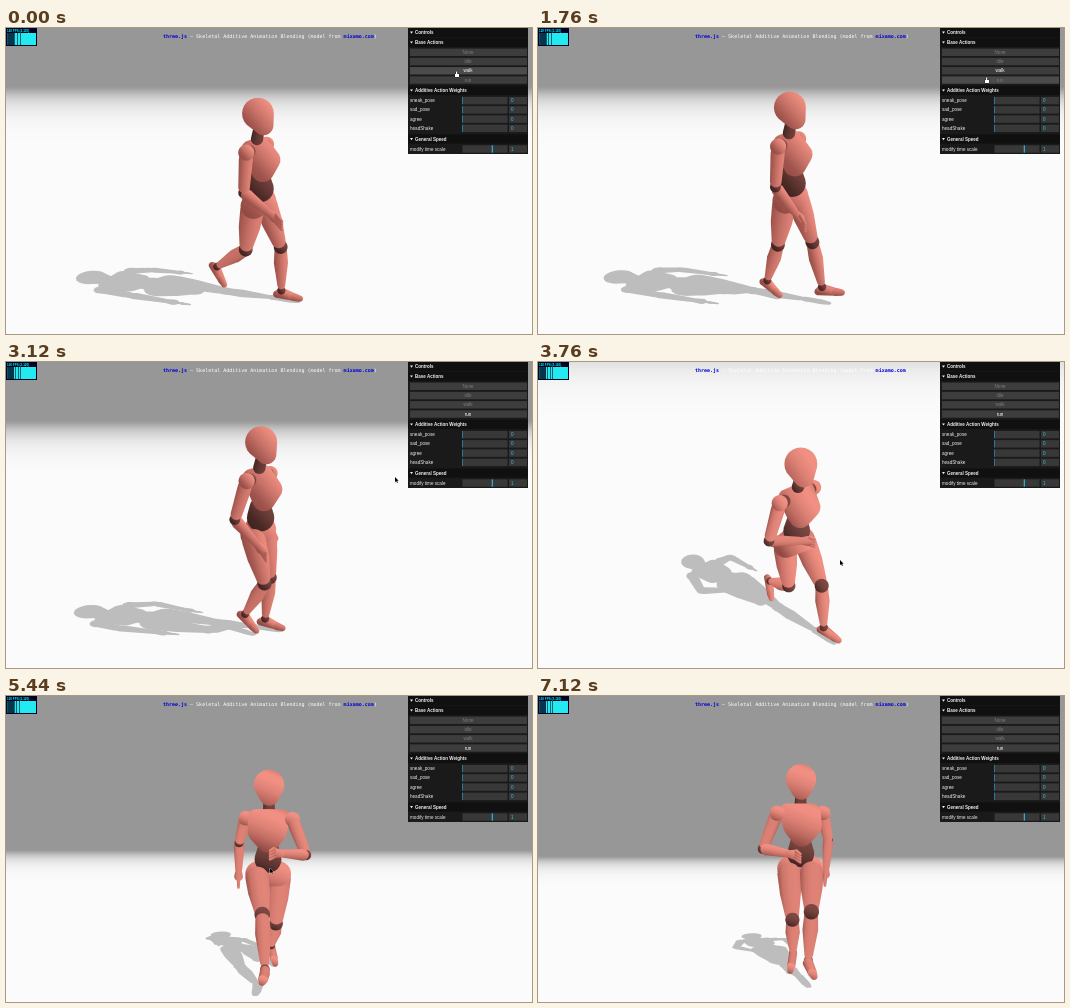
These frames come from a looping animation (526 px wide and 306 px high, 7.2 s). An HTML page with a canvas:

```html
<!DOCTYPE html>
<html lang="en">
<head>
<meta charset="utf-8">
<title>Skeletal blending</title>
<style>
html, body { margin: 0; width: 100%; height: 100%; overflow: hidden; background: #979797; }
canvas { display: block; }
</style>
</head>
<body>
<canvas id="stage" width="526" height="306"></canvas>
<script>
const ctx = document.getElementById('stage').getContext('2d');
const W = 526, H = 306, LOOP = 7200, STEP = 80;
const CX = 263, CY = 166, FOCAL = 396, ORBIT = 3.317;
const { sin, cos, exp, hypot, min, max, floor, PI } = Math;
const TAU = 2 * PI;

const clamp = v => min(1, max(0, v));
const smooth = v => (v = clamp(v)) * v * (3 - 2 * v);
const mix = (a, b, k) => a + (b - a) * k;
const mean = list => list.reduce((s, v) => s + v, 0) / list.length;
const wave = p => cos(TAU * p);
const bump = (p, mid, width) => {
  const d = p - mid - Math.round(p - mid);
  return exp(-((d / width) ** 2));
};

// Eased interpolation over rows of [time, ...values].
function track(keys, t) {
  let i = 0;
  while (i < keys.length - 2 && t >= keys[i + 1][0]) i++;
  const [a, b] = [keys[i], keys[i + 1]];
  const k = smooth((t - a[0]) / (b[0] - a[0]));
  return a.slice(1).map((v, n) => mix(v, b[n + 1], k));
}

// Time, azimuth and pitch in degrees.
const CAMERA = [[0, -62, 17.5], [3240, -62, 17.5], [3760, -35, 28.5], [4800, -4, 5.8], [5760, -4, 2.2], [7200, -4, 2.2]];
const POINTER = [[0, 451, 46], [880, 451, 46], [1600, 449, 52], [2720, 449, 52], [3120, 389, 115],
  [3760, 302, 198], [4800, 267, 176], [5440, 264, 172], [6080, 376, 28], [6400, 402, -14], [7200, 402, -14]];

let view;
function setCamera(t) {
  const [az, pitch] = track(CAMERA, t).map(d => d * PI / 180);
  view = { sa: sin(az), ca: cos(az), sp: sin(pitch), cp: cos(pitch) };
  const toEye = ([x, y, z]) => {
    const near = x * view.sa + z * view.ca;
    return [x * view.ca - z * view.sa, y * view.cp - near * view.sp, near * view.cp + y * view.sp];
  };
  view.light = toEye([.21, .69, .69]);
  view.project = ([x, y, z]) => {
    const [h, v, d] = toEye([x, y - 1, z]);
    const scale = FOCAL / (ORBIT - d);
    return [CX + h * scale, CY - v * scale, scale];
  };
}

// Joint angles: hip, knee, shoulder, elbow, forearm turn, arm spread.
const walk = p => [.1 + .38 * wave(p), .1 + .95 * bump(p, .68, .13) + .3 * bump(p, .12, .1),
  -.2 + .2 * wave(p), .65 + .35 * wave(p - .12), .1, .12];
const run = p => [.4 + .45 * wave(p), .62 + .8 * bump(p, .7, .18),
  -.4 + .4 * wave(p), 1.2 + .45 * wave(p), .8, .36];

function buildBody(t) {
  const parts = [];
  const w = smooth((t - 2960) / 440);
  const walkPhase = .09 + t / 970, runPhase = .08 + (t - 3760) / 700;
  const gait = shift => {
    const r = run(runPhase + shift);
    return walk(walkPhase + shift).map((v, i) => mix(v, r[i], w));
  };
  const lean = .13 * w, rootZ = -.1;
  const twist = mix(.1 * wave(walkPhase), .24 * wave(runPhase), w);
  const add = (spheres, tone = 'skin', bias = 0) => parts.push({ spheres, tone, bias });
  const turn = ([x, y, z], a) => [x * cos(a) + z * sin(a), y, z * cos(a) - x * sin(a)];
  const torso = (x, y, z, a = twist) => {
    [x, y, z] = turn([x, y, z], a);
    return [x, y * cos(lean) - z * sin(lean), rootZ + y * sin(lean) + z * cos(lean)];
  };
  const move = (p, d, len) => p.map((v, i) => v + d[i] * len);
  const ball = (p, r) => [...p, r];

  add([ball(torso(0, .755, 0, 0), .127), ball(torso(0, .665, .05, 0), .08)]);
  add([ball(torso(0, .55, -.01), .05), ball(torso(0, .62, .005, 0), .046)], 'joint', -.04);
  add([ball(torso(-.11, .485, -.02), .07), ball(torso(.11, .485, -.02), .07),
    ball(torso(-.07, .37, .07), .092), ball(torso(.07, .37, .07), .092), ball(torso(0, .29, .04), .095)]);
  add([ball(torso(0, .13, .015), .115), ball(torso(0, .22, .01), .09)], 'joint', -.04);
  add([ball([-.09, 0, rootZ], .108), ball([.09, 0, rootZ], .108), ball([0, .04, rootZ], .112)]);

  for (const side of [1, -1]) {
    const [hip, knee] = gait(side > 0 ? 0 : .5);
    const [, , shoulder, elbow, inward, spread] = gait(side > 0 ? .5 : 0);

    const shin = hip - knee, pitch = .75 * shin;
    const hipAt = [side * .1, 0, rootZ];
    const thighDir = [-side * .07, -cos(hip), sin(hip)];
    const shinDir = [-side * .04, -cos(shin), sin(shin)];
    const kneeAt = move(hipAt, thighDir, .44), ankle = move(kneeAt, shinDir, .42);
    const foot = (f, d, r) => [ankle[0] + side * f * .18, ankle[1] + f * sin(pitch) - d * cos(pitch),
      ankle[2] + f * cos(pitch) + d * sin(pitch), r];
    add([ball(move(hipAt, thighDir, .05), .1), ball(move(hipAt, thighDir, .2), .092), ball(move(kneeAt, thighDir, -.055), .062)]);
    add([ball(kneeAt, .061)], 'joint');
    add([ball(move(kneeAt, shinDir, .045), .056), ball(move(kneeAt, shinDir, .15), .063), ball(move(ankle, shinDir, -.05), .035)]);
    add([ball(ankle, .037)], 'joint');
    add([foot(0, .01, .037), foot(-.045, .045, .033), foot(.1, .047, .037)]);
    add([foot(.12, .051, .036), foot(.17, .057, .027)]);

    const reach = shoulder + elbow;
    const upper = turn([side * spread, -cos(shoulder) * cos(spread), sin(shoulder)], twist);
    const fore = turn([-side * sin(inward) * sin(reach), -cos(reach), cos(inward) * sin(reach)], twist);
    const top = torso(side * .2, .475, -.01), elbowAt = move(top, upper, .32), wrist = move(elbowAt, fore, .26);
    add([ball(top, .063)]);
    add([ball(torso(side * .155, .475, -.01), .052)], 'joint', -.02);
    add([ball(move(top, upper, .055), .055), ball(move(elbowAt, upper, -.045), .046)]);
    add([ball(elbowAt, .043)], 'joint');
    add([ball(move(elbowAt, fore, .035), .049), ball(move(wrist, fore, -.02), .033)]);
    add([ball(wrist, .029), ball(move(wrist, fore, .055), .04)]);
    for (let k = 0; k < 4; k++) {
      const base = move(wrist, fore, .07);
      base[1] += (k - 1.5) * .022;
      const tip = move(base, fore, .055 - .02 * w);
      tip[1] -= .018;
      add([ball(base, .015), ball(tip, .012)]);
    }
  }
  const ground = min(...parts.flatMap(p => p.spheres.map(s => s[1] - s[3])));
  parts.forEach(p => p.spheres.forEach(s => { s[1] -= ground; }));
  return parts;
}

function convexHull(points) {
  points.sort((a, b) => a[0] - b[0] || a[1] - b[1]);
  const half = list => {
    const out = [];
    for (const p of list) {
      while (out.length > 1) {
        const [a, b] = out.slice(-2);
        if ((b[0] - a[0]) * (p[1] - a[1]) - (b[1] - a[1]) * (p[0] - a[0]) > 0) break;
        out.pop();
      }
      out.push(p);
    }
    return out.slice(0, -1);
  };
  return half(points).concat(half(points.slice().reverse()));
}

function fillHull(points) {
  ctx.beginPath();
  convexHull(points).forEach(([x, y], i) => i ? ctx.lineTo(x, y) : ctx.moveTo(x, y));
  ctx.fill();
}

const ring = fn => Array.from({ length: 24 }, (_, i) => fn(cos(i * TAU / 24), sin(i * TAU / 24)));

const TONES = {
  skin: [[146, 75, 68], [240, 143, 130]],
  joint: [[62, 34, 32], [126, 72, 66]]
};
function shade(tone, intensity) {
  const [dark, lit] = TONES[tone];
  const k = clamp(.28 + .74 * intensity);
  return `rgb(${dark.map((v, i) => Math.round(mix(v, lit[i], k)))})`;
}

function drawPart({ tone, discs }) {
  const first = discs[0], last = discs[discs.length - 1];
  const size = max(...discs.map(d => d[2]));
  const [lx, up, lz] = view.light, ly = -up;
  const dx = last[0] - first[0], dy = last[1] - first[1], len = hypot(dx, dy);
  let strength = hypot(lx, ly), nx = lx / strength, ny = ly / strength, extent = size * 1.1;
  // Long limbs are shaded across their axis, rounder parts along the light.
  if (discs.length < 4 && len > size * 1.3) {
    [nx, ny] = [-dy / len, dx / len];
    strength = lx * nx + ly * ny;
    if (strength < 0) [nx, ny, strength] = [-nx, -ny, -strength];
  } else if (discs.length > 1) extent = size + len * .4;
  const mx = mean(discs.map(d => d[0])), my = mean(discs.map(d => d[1]));
  const fill = ctx.createLinearGradient(mx - nx * extent, my - ny * extent, mx + nx * extent, my + ny * extent);
  for (const k of [-1, -.5, 0, .5, .8, 1]) {
    fill.addColorStop((k + 1) / 2, shade(tone, k * strength + lz * Math.sqrt(1 - k * k)));
  }
  ctx.fillStyle = fill;
  fillHull(discs.flatMap(([x, y, r]) => ring((c, s) => [x + c * r, y + s * r])));
}

function drawFigure(t) {
  const parts = buildBody(t);
  ctx.fillStyle = '#bdbdbd';
  for (const { spheres } of parts) {
    fillHull(spheres.flatMap(([x, y, z, r]) =>
      ring((c, s) => view.project([x - .3 * y + c * r, 0, z - y + s * r * 1.3]))));
  }
  for (const part of parts) {
    const seen = part.spheres.map(view.project);
    part.discs = seen.map(([x, y, scale], i) => [x, y, part.spheres[i][3] * scale]);
    part.near = part.bias - mean(seen.map(p => FOCAL / p[2]));
  }
  parts.sort((a, b) => a.near - b.near).forEach(drawPart);
}

function drawFloor() {
  const height = 1 + ORBIT * view.sp;
  for (let y = 0; y < H; y++) {
    const slope = view.sp + (y + .5 - CY) / FOCAL * view.cp;
    const fog = slope > 0 ? smooth((height / slope - 10) / 40) : 1;
    const v = Math.round(mix(251, 151, fog));
    ctx.fillStyle = `rgb(${v},${v},${v})`;
    ctx.fillRect(0, y, W, 1);
  }
}

function rect(x, y, w, h, color) {
  ctx.fillStyle = color;
  ctx.fillRect(x, y, w, h);
}

function text(str, x, y, color, font, align = 'left') {
  ctx.font = font;
  ctx.textAlign = align;
  ctx.fillStyle = color;
  ctx.fillText(str, x, y);
}

const MONO = '5px "DejaVu Sans Mono", monospace';
const MONO_BOLD = 'bold ' + MONO;
const LABEL = '4.6px "Liberation Sans", sans-serif';
const HEADING = 'bold 4.5px "Liberation Sans", sans-serif';

function drawTitle() {
  let x = 157;
  for (const [str, color, font] of [
    ['three.js', '#0000d8', MONO_BOLD],
    [' – Skeletal Additive Animation Blending (model from ', '#fff', MONO],
    ['mixamo.com', '#0000d8', MONO_BOLD],
    [')', '#fff', MONO]
  ]) {
    text(str, x, 10, color, font);
    x += ctx.measureText(str).width;
  }
}

function drawStats(t) {
  rect(0, 0, 31, 18, '#002');
  text('120 FPS (2-120)', 1, 3.6, '#0ff', 'bold 3px "Liberation Sans", sans-serif');
  rect(1.5, 5, 28.5, 12, '#23e9f0');
  const shift = floor(t / 1000);
  rect(1.5, 5, 6.5, 12, '#073549');
  for (let i = 0; i < 3; i++) rect(8 + (i * 3 + shift * 2) % 8, 5, .8, 12, '#064052');
}

function heading(str, y) {
  rect(402, y - 4.7, 120, 9.4, '#101010');
  ctx.fillStyle = '#eee';
  ctx.beginPath();
  ctx.moveTo(404, y - 1);
  ctx.lineTo(407, y - 1);
  ctx.lineTo(405.5, y + 1.2);
  ctx.fill();
  text(str, 409, y + 1.6, '#eee', HEADING);
}

function slider(name, y, value, fraction) {
  text(name, 404, y + 1.5, '#ebebeb', LABEL);
  rect(456.5, y - 3.7, 45, 7.4, '#383838');
  rect(456.3 + fraction * 44, y - 3.7, fraction ? 1 : .5, 7.4, '#2cc9ff');
  rect(503, y - 3.7, 18, 7.4, '#383838');
  text(value, 505, y + 1.6, '#2cc9ff', LABEL);
}

function drawPanel(t) {
  const active = t < 2640 ? 'walk' : 'run';
  const hover = t < 1440 ? 'walk' : t < 2800 ? 'run' : '';
  rect(402, 0, 120, 126, '#1a1a1a');
  heading('Controls', 4.5);
  heading('Base Actions', 14.4);
  ['None', 'idle', 'walk', 'run'].forEach((name, i) => {
    const y = 24.3 + i * 9.25;
    rect(404, y - 3.7, 117, 7.4, name === hover ? '#4b4b4b' : '#3d3d3d');
    text(name, 462, y + 1.6, name === active ? '#fff' : '#7c7c7c', LABEL, 'center');
  });
  heading('Additive Action Weights', 62.4);
  ['sneak_pose', 'sad_pose', 'agree', 'headShake'].forEach((name, i) => slider(name, 72.6 + i * 9.25, '0', 0));
  heading('General Speed', 111);
  slider('modify time scale', 121, '1', .67);
}

function drawPointer(t) {
  const [x, y] = track(POINTER, t);
  if (y < -8) return;
  ctx.save();
  ctx.translate(x, y);
  ctx.lineWidth = .6;
  ctx.beginPath();
  if (x > 403) {
    ctx.rect(-1, -2.5, 1.2, 3);
    ctx.rect(-2, 0, 4, 3);
    ctx.fillStyle = '#fff';
    ctx.strokeStyle = '#111';
  } else {
    [[0, 0], [0, 5.2], [1.2, 4.1], [2, 5.9], [2.9, 5.5], [2.1, 3.8], [3.7, 3.7]].forEach(p => ctx.lineTo(...p));
    ctx.closePath();
    ctx.fillStyle = '#000';
    ctx.strokeStyle = '#fff';
  }
  ctx.stroke();
  ctx.fill();
  ctx.restore();
}

function frame(now) {
  const t = floor((now % LOOP) / STEP) * STEP;
  setCamera(t);
  drawFloor();
  drawFigure(t);
  drawTitle();
  drawStats(t);
  drawPanel(t);
  drawPointer(t);
  requestAnimationFrame(frame);
}
requestAnimationFrame(frame);
</script>
</body>
</html>
```
